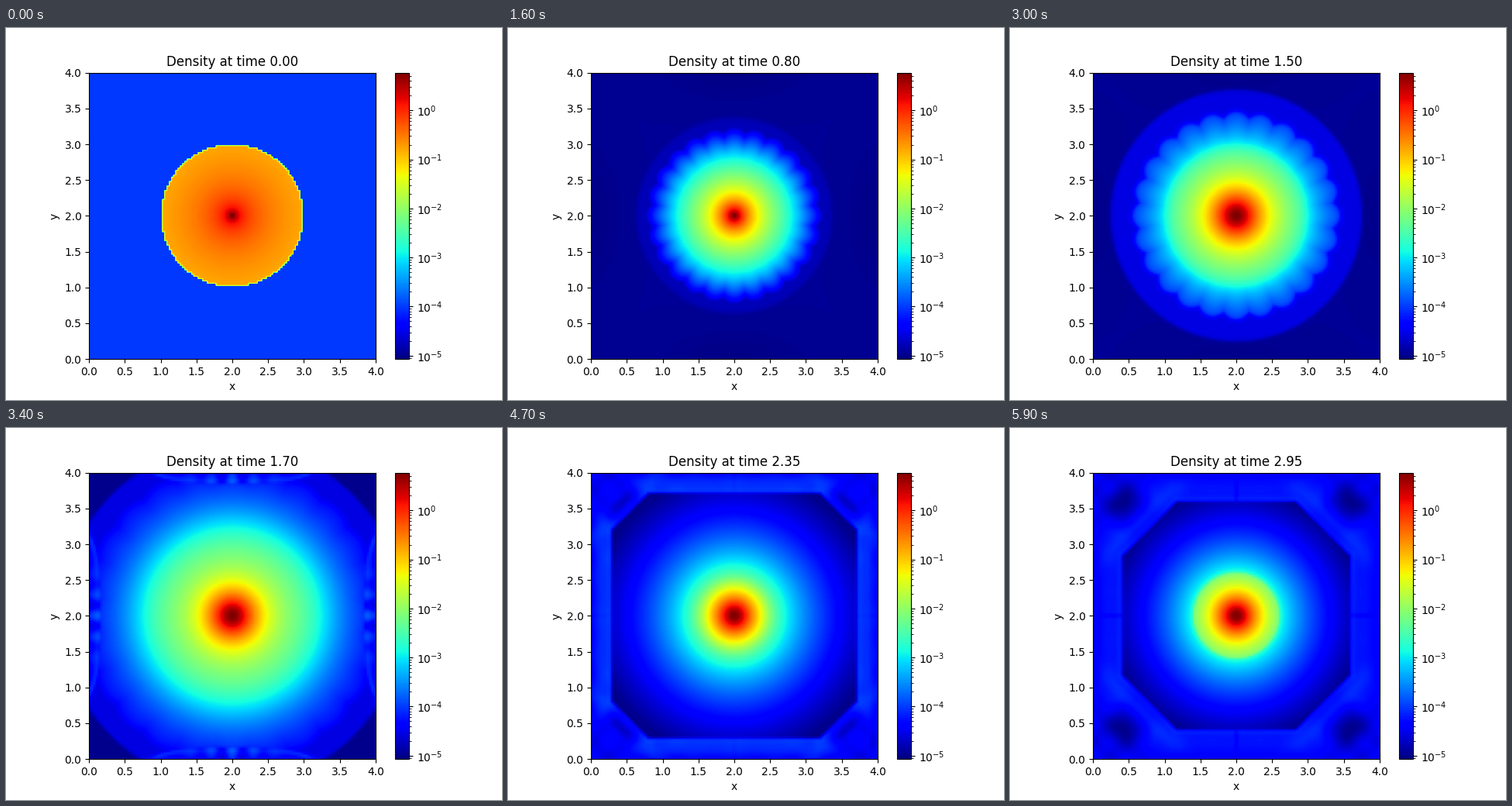
Animation of 640 by 480 pixels, one loop 6 s. Source, as a matplotlib script:

```python
import numpy as np
import matplotlib.pyplot as plt
from matplotlib.animation import FuncAnimation
from matplotlib.colors import LogNorm

N = 128
FRAMES = 60
DT = 0.05
FLOOR = -5.0

axis = (np.arange(N) + 0.5) * 4 / N - 2
X, Y = np.meshgrid(axis, axis)
R = np.hypot(X, Y)
SOFT = np.hypot(R, 2 / N)
LOBES = 1 - np.abs(np.cos(12 * np.arctan2(Y, X)))

# Distances to the walls, along the nearest wall and to the corner.
U, V = 2 - np.abs(X), 2 - np.abs(Y)
NEAR = np.minimum(U, V)
ALONG = 2 - np.maximum(U, V)
CORNER = U + V
SKEW = U - V


def ramp(t, start, end):
    return np.clip((t - start) / (end - start), 0, 1)


def pulse(t, start, peak, end):
    return np.interp(t, [start, peak, end], [0, 1, 0])


def bell(x, width):
    return np.exp(-(x / width) ** 2)


def step(x, width):
    return .5 * (1 + np.tanh(x / width))


def mix(a, b, weight):
    return a + (b - a) * weight


def infall(r, t):
    """Collapsing 1/r cloud whose rim spreads as a rarefaction."""
    rim = np.clip((r - 1 + .55 * t) / (1.1 * t), 0, None)
    return -.8 - np.log10(r) - 2.3 * t * r - 2.9 * rim ** 2


def core(r, size):
    """Power law around a flat centre."""
    return .8 - 2.4 * np.log10(1 + (r / size) ** 2)


def cloud(t):
    """Log density of the cloud: infall, bounce, then slow settling."""
    edge = np.interp(t, [0, .45, .7, 1.4, 1.7, 2.1],
                     [1, 1.25, 1.35, 1.44, 2.38, 3.6])
    lobe_edge = edge - .3 * ramp(t, .45, 1.2)
    ripple = .12 * pulse(t, .3, 1.25, 2.1)
    r = SOFT + ripple * bell(SOFT - lobe_edge + .1, .22) * LOBES

    # Hot centre behind a front, thinner gas ahead of it.
    front = np.interp(t, [.75, 1.25, 1.7, 2.2, 2.95], [-.1, .59, 1.3, .42, .6])
    blur = .015 + .2 * pulse(t, 1.25, 1.8, 2.95)
    outer_size = np.interp(t, [1.3, 1.7, 2.05, 2.35, 2.95],
                           [.103, .18, .15, .123, .11])
    inner = core(r, .18 - .03 * ramp(t, 1.7, 2.05))
    outer = mix(infall(r, t), core(r, outer_size), ramp(t, .5, 1.15))
    log = mix(outer, inner, step(front - r, blur))
    log += .4 * pulse(t, 1.3, 1.7, 2.0) * bell(r - 1.05, .4)

    # Faint halo up to the outer edge, empty space beyond.
    halo = FLOOR + .45 * ramp(t, .45, 1.2)
    if t < 2:
        log = mix(halo, np.maximum(log, halo), step(lobe_edge - r, .03))
    space = FLOOR + .1 * pulse(t, .45, 1.25, 1.7)
    log = mix(space, np.maximum(log, FLOOR), step(edge - R, .025))
    return log - .14 * pulse(t, .3, 1.25, 1.6) * bell(NEAR, .35) * bell(ALONG, .9)


def wall_shell(t):
    """Log density and mask of the gas thrown back by the walls."""
    width = min(.16 + .2 * (t - 1.7), 2 * (t - 1.62))
    lens = np.clip(1 - (ALONG / (1.25 + 8 * max(t - 1.7, 0))) ** 4, 0, 1)
    cut = 1.58 * max(t - 1.95, 0) ** .4
    early = 1 - ramp(t, 1.7, 2.4)
    late = ramp(t, 1.95, 2.35)

    flare = 1 + .3 * pulse(t, 1.8, 2.05, 2.35) * (ALONG / 1.6) ** 4
    depth = np.maximum(width * lens * flare - .04 * (1 - lens) - NEAR,
                       (cut - CORNER) / np.sqrt(2))
    mask = step(depth, .015)

    # Bright strip along each wall and a line behind the front.
    strip = np.clip((1.55 - ALONG) / .4, 0, 1)
    glow = .25 + .2 * pulse(t, 1.6, 2.2, 2.95)
    log = -4.48 + glow * strip * bell(NEAR - .65 * width, .6 * width)
    log += .12 * bell(depth - .03, .04)

    # Knots where the rebound started, then a thin seam.
    knots = np.cos(2 * np.pi * ALONG / (.3 + .5 * max(t - 1.7, 0)))
    log += .3 * early * knots * bell(ALONG, .45)
    log -= .15 * ramp(t, 2.1, 2.9) * bell(ALONG, .025)

    # Dark eddy in each corner, with a bright band ahead of it.
    thick = .12 + .3 * max(t - 2.35, 0)
    log -= .55 * late * bell(CORNER - .86, thick) * bell(SKEW, .4)
    log += .28 * late * bell(CORNER - cut + .25, .2) * bell(SKEW, .9)
    weave = np.cos(13 * U) * np.cos(13 * V) * bell(CORNER, 1.1)
    return log + (.12 + .13 * early) * weave, mask


def density(frame):
    if frame == 0:
        return np.where(R < .98, 1 / (2 * np.pi * np.hypot(SOFT, 2 / N * .1)), 1e-4)
    t = frame * DT
    log = cloud(t)
    if t > 1.61:
        shell, mask = wall_shell(t)
        log = mix(log, shell, mask)
    return 10 ** np.maximum(log, -5.06)


fig, ax = plt.subplots(figsize=(6.4, 4.8), dpi=100)
image = ax.imshow(density(0), origin="lower", extent=(0, 4, 0, 4),
                  cmap="jet", norm=LogNorm(8.5e-6, 5.88))
fig.colorbar(image, ax=ax)
ticks = np.arange(0, 4.1, .5)
ax.set(xlabel="x", ylabel="y", xticks=ticks, yticks=ticks)
title = ax.set_title("Density at time 0.00")


def update(frame):
    image.set_data(density(frame))
    title.set_text(f"Density at time {frame * DT:.2f}")
    return image, title


anim = FuncAnimation(fig, update, frames=FRAMES, interval=100,
                     repeat=True, repeat_delay=0)
plt.show()
```
